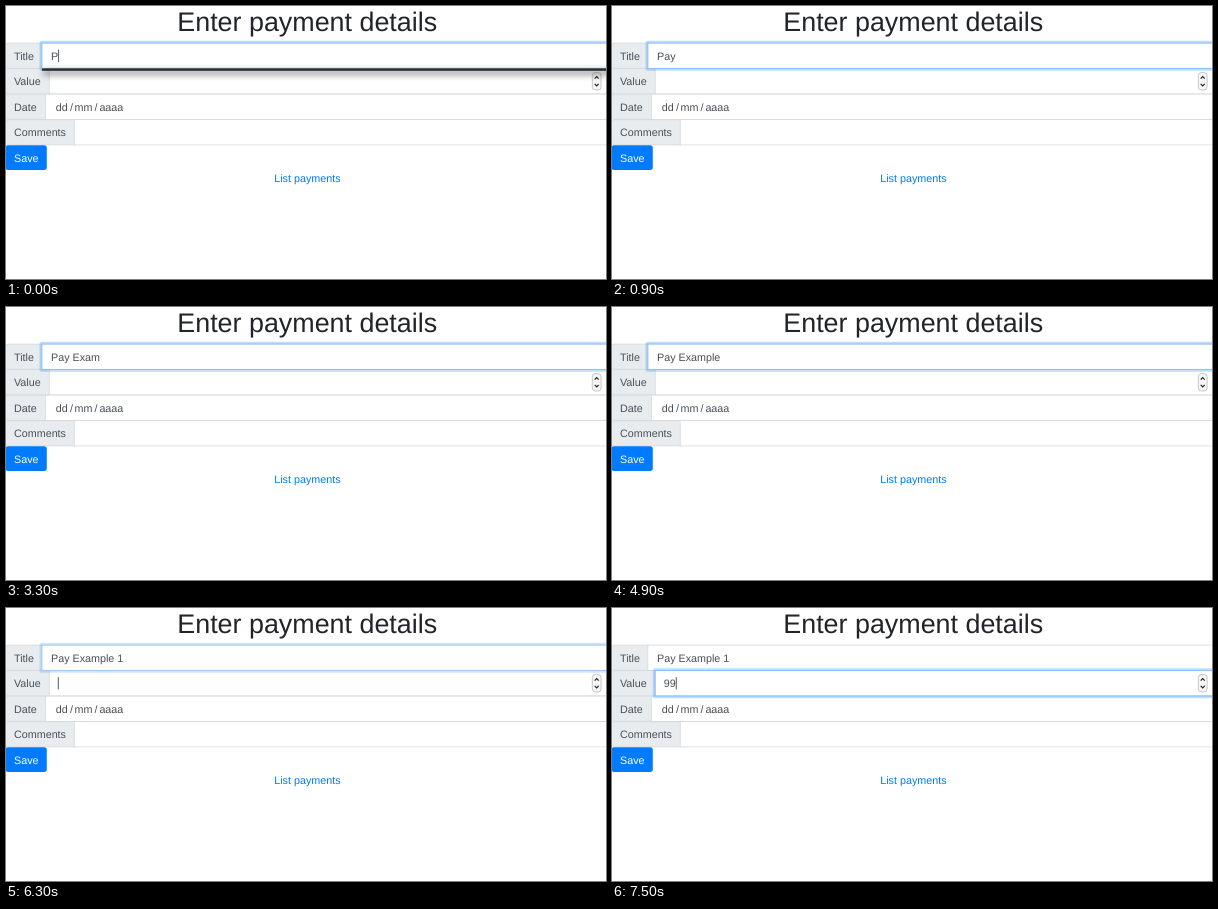
Recreate the animation shown at these times as an HTML page. Size 600 by 273 pixels, loop 8000 ms.

```html
<!DOCTYPE html>
<html lang="en">
<head>
<meta charset="utf-8">
<title>Payment form</title>
<style>
  html, body { margin: 0; width: 100%; height: 100%; overflow: hidden; background: #fff; }
  svg { display: block; width: 100%; height: 100%; }
  text {
    font: 10.75px "Liberation Sans", Arial, sans-serif;
    fill: #495057;
    white-space: pre;
    text-rendering: geometricPrecision;
  }
  .heading { font-size: 26.87px; fill: #212529; text-anchor: middle; }
  .link { fill: #007bff; text-anchor: middle; }
  .onblue { fill: #fff; }
  .addon { fill: #e9ecef; }
  .field { fill: #fff; }
  .addon, .field { stroke: #ced4da; stroke-width: .67; }
  .glow { fill: none; stroke: #007bff; stroke-opacity: .25; stroke-width: 2.15; }
  .edge { fill: none; stroke: #80bdff; stroke-width: .75; }
  .spin { fill: #f6f6f6; stroke: #b4b4b4; stroke-width: .7; }
  .arrow { fill: none; stroke: #222; stroke-width: 1.2; }
  .menu { fill: #2f2f2d; }
  .option { font: 9.4px "Noto Sans", "Open Sans", sans-serif; fill: #f4f4f2; }
  #caret { fill: #40464c; }
</style>
</head>
<body>
<svg viewBox="0 0 600 273" preserveAspectRatio="none">
  <defs>
    <filter id="blur" x="-10%" y="-100%" width="120%" height="400%">
      <feGaussianBlur stdDeviation="3"/>
    </filter>
  </defs>
  <text class="heading" x="301.2" y="24.9">Enter payment details</text>
  <g id="rows"></g>

  <text x="49.8" y="104.7">dd</text>
  <text x="63.9" y="104.7">/</text>
  <text x="68.6" y="104.7">mm</text>
  <text x="88.5" y="104.7">/</text>
  <text x="93.4" y="104.7">aaaa</text>

  <rect class="spin" x="586.3" y="66.6" width="8.8" height="17.4" rx="3"/>
  <path class="arrow" d="M588.7 72.6l2-2 2 2M588.7 77.8l2 2 2-2"/>

  <rect x="-.6" y="139.2" width="41.4" height="24.8" rx="2.7" fill="#007bff"/>
  <text class="onblue" x="8" y="155.7">Save</text>
  <text class="link" x="301.4" y="176.4">List payments</text>

  <g id="rings"></g>
  <text id="title" x="45" y="53.6"></text>
  <text id="value" x="51.8" y="79.1"></text>
  <rect id="caret" width=".9" height="12.4"/>

  <g id="popup">
    <rect id="shade" x="37" y="64" width="580" fill="#000" opacity=".4" filter="url(#blur)"/>
    <rect id="menu" class="menu" x="36" y="62.4" width="580"/>
    <text id="option" class="option" x="40.6" y="74.2">Pagamento de fatura</text>
  </g>
</svg>
<script>
  const NS = "http://www.w3.org/2000/svg";
  const LOOP = 8000, TOP = 37.1, STEP = 25.53, RIGHT = 620;
  const $ = id => document.getElementById(id);

  function add(parent, tag, attrs, text) {
    const el = document.createElementNS(NS, tag);
    for (const k in attrs) el.setAttribute(k, attrs[k]);
    if (text) el.textContent = text;
    parent.append(el);
    return el;
  }

  // label and left edge of its input
  const rows = [["Title", 35.9], ["Value", 43.2], ["Date", 39.3], ["Comments", 68.2]];
  rows.forEach(([label, x], i) => {
    const y = TOP + i * STEP, height = STEP - .3;
    add($("rows"), "rect", { class: "addon", x: -.5, y, width: x + 4, height, rx: 2.7 });
    add($("rows"), "rect", { class: "field", x, y, width: RIGHT - x, height });
    add($("rows"), "text", { x: 8, y: y + 16.5 }, label);
  });

  function ring(i) {
    const x = rows[i][1], y = TOP + i * STEP, w = RIGHT - x, h = STEP - .3;
    const g = add($("rings"), "g", {});
    add(g, "rect", { class: "glow", x: x - 1.3, y: y - 1.3, width: w, height: h + 2.6, rx: 1 });
    add(g, "rect", { class: "edge", x, y, width: w, height: h });
    return g;
  }
  const titleRing = ring(0), valueRing = ring(1);

  // start time, title, value, caret owner
  const cues = [
    [0, "P", "", "title"],
    [300, "Pa", "", "title"],
    [800, "Pay", "", ""],
    [1400, "Pay", "", "title"],
    [1800, "Pay ", "", "title"],
    [1900, "Pay E", "", "title"],
    [2100, "Pay Ex", "", "title"],
    [2200, "Pay Ex", "", ""],
    [2900, "Pay Exa", "", "title"],
    [3200, "Pay Exam", "", "title"],
    [3300, "Pay Exam", "", ""],
    [3700, "Pay Exam", "", "title"],
    [3900, "Pay Examp", "", "title"],
    [4500, "Pay Examp", "", ""],
    [4700, "Pay Exampl", "", "title"],
    [4800, "Pay Example", "", "title"],
    [4900, "Pay Example", "", ""],
    [5100, "Pay Example ", "", "title"],
    [5300, "Pay Example 1", "", "title"],
    [5800, "Pay Example 1", "", ""],
    [6300, "Pay Example 1", "", "value"],
    [6700, "Pay Example 1", "", ""],
    [7400, "Pay Example 1", "9", "value"],
    [7500, "Pay Example 1", "99", "value"]
  ];

  const ramp = (t, from, span) => Math.min(1, Math.max(0, (t - from) / span));
  let shown = null;

  function showCue(cue) {
    const [start, title, value, owner] = cue;
    $("title").textContent = title;
    $("value").textContent = value;
    $("caret").style.display = owner ? "" : "none";
    if (owner) {
      const el = $(owner);
      const end = el.textContent ? el.getComputedTextLength() : 0;
      $("caret").setAttribute("x", +el.getAttribute("x") + end);
      $("caret").setAttribute("y", el.getAttribute("y") - 10);
    }
    const open = start >= 300;
    $("popup").style.display = start < 800 ? "" : "none";
    $("menu").setAttribute("height", open ? 16.4 : 2.4);
    $("shade").setAttribute("height", open ? 17 : 5);
    $("option").style.display = open ? "" : "none";
  }

  function draw(now) {
    const t = now % LOOP;
    const cue = cues.findLast(c => c[0] <= t) || cues[0];
    if (cue !== shown) showCue(shown = cue);
    titleRing.setAttribute("opacity", 1 - ramp(t, 6250, 200));
    valueRing.setAttribute("opacity", ramp(t, 6300, 200));
  }

  const begin = performance.now();
  function tick() {
    draw(performance.now() - begin);
    requestAnimationFrame(tick);
  }
  tick();
</script>
</body>
</html>
```
